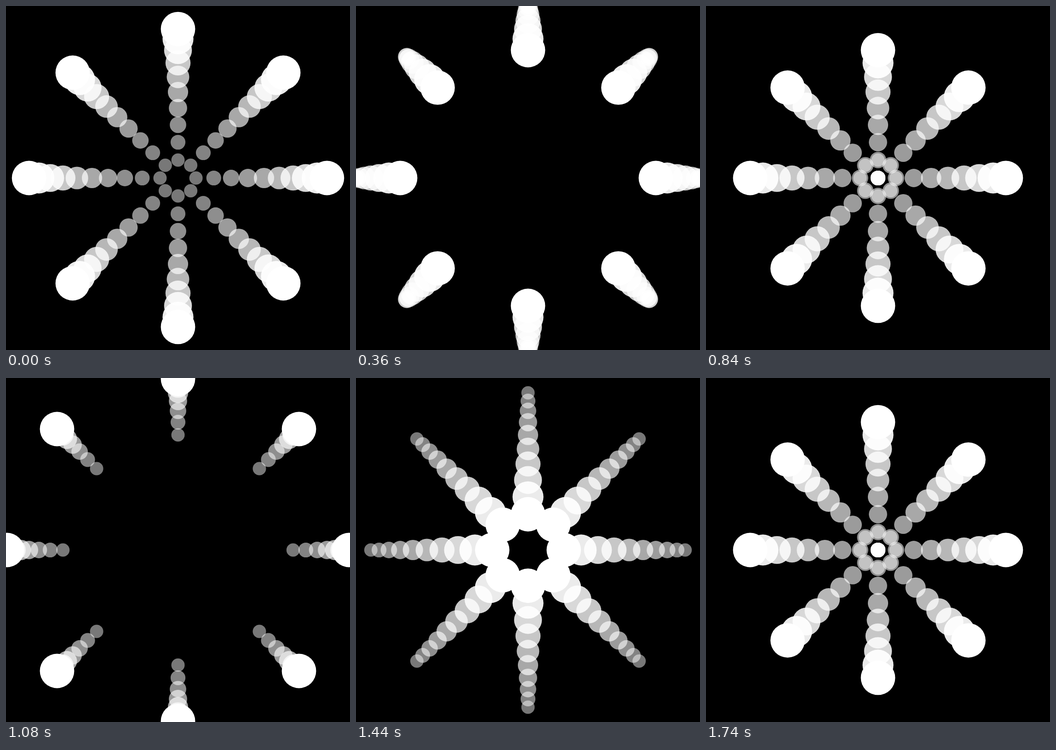
An HTML page with a canvas for the animation above (1800 ms loop, 748 by 748 pixels).

```html
<!DOCTYPE html>
<html lang="en">
<head>
<meta charset="utf-8">
<title>Radial pulse</title>
<style>
  html, body { margin: 0; width: 100%; height: 100%; overflow: hidden; background: #000; }
  canvas { display: block; width: 748px; height: 748px; }
</style>
</head>
<body>
<canvas id="stage" width="748" height="748"></canvas>
<script>
const ctx = document.getElementById('stage').getContext('2d');
const SIZE = 748, HALF = SIZE / 2;
const ARMS = 8, TRAIL = 10;
const STEP_MS = 60, STEPS = 30;
const UNIT = Math.PI / 30; // phase gap between neighbouring dots

function dot(x, y, r, alpha) {
  ctx.fillStyle = `rgba(255,255,255,${alpha})`;
  ctx.beginPath();
  ctx.arc(x, y, r, 0, Math.PI * 2);
  ctx.fill();
}

function draw(step) {
  ctx.fillStyle = '#000';
  ctx.fillRect(0, 0, SIZE, SIZE);
  const head = TRAIL + 2 * step;
  for (let k = TRAIL - 1; k >= 0; k--) {
    const dist = HALF * Math.sin((head - k) * UNIT);
    const radius = HALF * 0.1 * 0.9 ** k;
    const alpha = 0.92 ** k;
    for (let i = 0; i < ARMS; i++) {
      const a = i * 2 * Math.PI / ARMS;
      dot(HALF + dist * Math.cos(a), HALF + dist * Math.sin(a), radius, alpha);
    }
  }
}

const start = performance.now();
let shown = 0;

function tick() {
  const step = Math.floor((performance.now() - start) / STEP_MS) % STEPS;
  if (step !== shown) draw(shown = step);
  requestAnimationFrame(tick);
}

draw(0);
requestAnimationFrame(tick);
</script>
</body>
</html>
```
